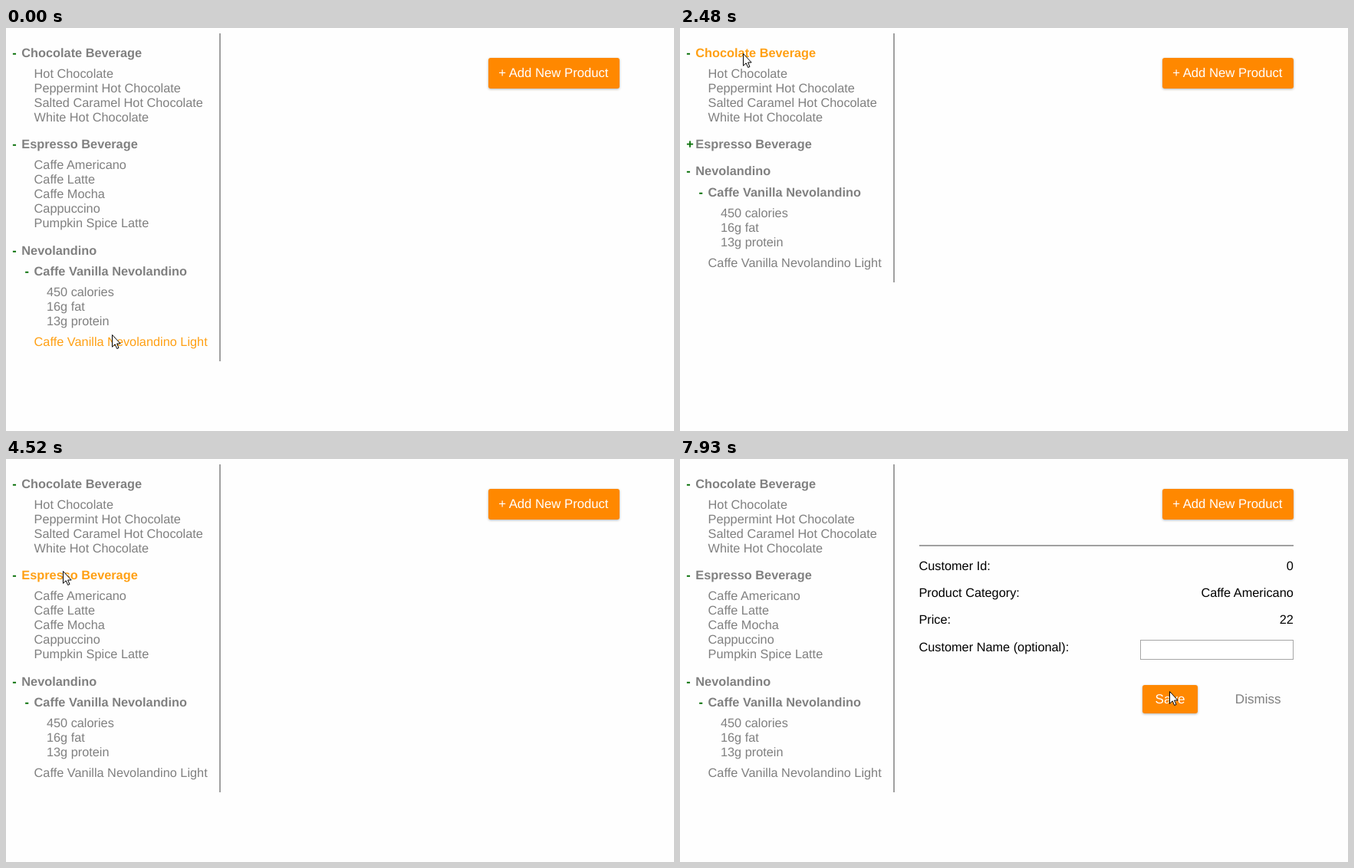
These frames come from a looping animation (871 px wide and 526 px high, 8 s). An HTML page:

```html
<!DOCTYPE html>
<html lang="en">
<head>
<meta charset="utf-8">
<title>Beverage menu</title>
<style>
  html, body { margin: 0; width: 100%; height: 100%; overflow: hidden; background: #fefefe; }
  svg { display: block; width: 871px; height: 526px; }
  text { font: 16.32px "Liberation Sans", Arial, sans-serif; text-rendering: geometricPrecision; white-space: pre; }
  #menu text { fill: #808080; }
  #menu .head { font-weight: bold; }
  #menu .mark { font-weight: bold; fill: #087008; }
  #menu .hover { fill: #ffa014; }
  .button { fill: #ff8800; filter: drop-shadow(0 1px 1.5px rgba(0, 0, 0, .3)); }
  .label { fill: #fff; }
  .small { font-size: 17.1px; }
  .line { fill: #a0a0a0; }
  .end { text-anchor: end; }
</style>
</head>
<body>
<svg viewBox="0 0 871 526">
  <rect id="bar" class="line" x="278" y="7" width="2"/>
  <g id="menu"></g>
  <rect class="button" x="629" y="39" width="171" height="40" rx="3"/>
  <rect id="focus" x="628.75" y="38.75" width="171.5" height="40.5" rx="2" fill="none" stroke="#6a9ee0" stroke-width="1.6"/>
  <text class="label" x="642.2" y="64" style="font-size:16.7px">+ Add New Product</text>
  <g id="form">
    <rect class="line" x="312" y="112" width="488" height="2"/>
    <text x="311.4" y="145">Customer Id:</text>
    <text x="311.4" y="180">Product Category:</text>
    <text x="311.4" y="215">Price:</text>
    <text x="311.4" y="251">Customer Name (optional):</text>
    <text class="end" x="799.8" y="145">0</text>
    <text class="end" id="category" x="799.8" y="180"></text>
    <text class="end" id="price" x="799.8" y="215"></text>
    <rect x="600.5" y="236.5" width="199" height="25" fill="#fff" stroke="#a6a6a6"/>
    <rect class="button" x="603" y="295" width="72" height="37" rx="3"/>
    <text class="label small" x="619.5" y="319">Save</text>
    <text class="small" x="723.8" y="319" fill="#808080">Dismiss</text>
  </g>
  <g id="cursor">
    <circle id="ring" cx="1" cy=".8" r="10" fill="none" stroke="#000" stroke-width="1.1"/>
    <path d="M.5 .5V16.3L4.2 12.8 6.7 18.5 9 17.5 6.6 12H11.2Z" fill="#fff" stroke="#000"/>
  </g>
</svg>
<script>
const LOOP = 8000;
const $ = id => document.getElementById(id);
const show = (el, on) => el.setAttribute('visibility', on ? 'visible' : 'hidden');
const within = (t, spans) => spans.some(([a, b]) => t >= a && t < b);

// Per group: height of its children and when they are folded away
const groups = [
  { height: 84.2, closed: [[2790, 3620]] },
  { height: 103.5, closed: [[1470, 4520]] },
  { height: 0, closed: [] }
];
const clicks = [[1320, 1600], [3470, 3735], [4400, 4520], [5890, 6010], [7400, 7540]];
// Pointer moves: start, last step, number of steps, destination
const start = [138, 400];
const moves = [
  [150, 1070, 8, 85, 155],
  [2030, 2480, 4, 82, 33],
  [3868, 4267, 4, 74, 146],
  [4770, 5310, 5, 722, 66],
  [6600, 7270, 6, 122, 180],
  [7660, 7930, 3, 638, 303]
];

const rows = [];
function addText(cls, x, str) {
  const el = document.createElementNS('http://www.w3.org/2000/svg', 'text');
  el.setAttribute('x', x);
  el.setAttribute('class', cls);
  el.textContent = str;
  $('menu').append(el);
  return el;
}
function addRow(group, level, y, str, head) {
  const x = 20.3 + 16.3 * level;
  rows.push({
    group, level, y,
    label: addText(head ? 'head' : '', x, str),
    mark: head && addText('mark', x - 12, '-')
  });
}
const addItems = (group, level, y, names) =>
  names.forEach((name, i) => addRow(group, level, y + 19 * i, name, false));

addRow(0, 0, 32, 'Chocolate Beverage', true);
addItems(0, 1, 59, ['Hot Chocolate', 'Peppermint Hot Chocolate', 'Salted Caramel Hot Chocolate', 'White Hot Chocolate']);
addRow(1, 0, 151.4, 'Espresso Beverage', true);
addItems(1, 1, 178.4, ['Caffe Americano', 'Caffe Latte', 'Caffe Mocha', 'Cappuccino', 'Pumpkin Spice Latte']);
addRow(2, 0, 290.3, 'Nevolandino', true);
addRow(2, 1, 317.6, 'Caffe Vanilla Nevolandino', true);
addItems(2, 2, 344.9, ['450 calories', '16g fat', '13g protein']);
addItems(2, 1, 409.9, ['Caffe Vanilla Nevolandino Light']);

function pointer(t) {
  let [x, y] = start;
  for (const [t0, t1, n, tx, ty] of moves) {
    if (t < t0) break;
    const step = Math.floor((t - t0) / (t1 - t0) * (n - 1) + 1e-6) + 1;
    const p = Math.min(1, step / n);
    const e = p * p * (3 - 2 * p);
    x += (tx - x) * e;
    y += (ty - y) * e;
  }
  return [Math.round(x), Math.round(y)];
}

function draw(t) {
  const [px, py] = pointer(t);
  const closed = groups.map(g => within(t, g.closed));
  const shift = n => groups.reduce((sum, g, i) => sum + (i < n && closed[i] ? g.height : 0), 0);

  for (const { group, level, y, label, mark } of rows) {
    const mid = Math.floor(y - shift(group));
    const visible = !level || !closed[group];
    label.setAttribute('y', mid + 6);
    label.classList.toggle('hover', px < 278 && py >= mid - 10 && py < mid + 9);
    show(label, visible);
    if (mark) {
      mark.setAttribute('y', mid + 6);
      mark.textContent = closed[group] ? '+' : '-';
    }
  }
  $('bar').setAttribute('height', Math.round(435.4 - shift(3)) - 7);

  const picked = t >= 7400;
  show($('focus'), t >= 5890 && !picked);
  show($('form'), t >= 6010);
  $('category').textContent = picked ? 'Caffe Americano' : 'Hot Chocolate';
  $('price').textContent = picked ? '22' : '10';

  $('cursor').setAttribute('transform', `translate(${px} ${py})`);
  show($('ring'), within(t, clicks));
}

const began = performance.now();
function tick() {
  draw((performance.now() - began) % LOOP);
  requestAnimationFrame(tick);
}
tick();
</script>
</body>
</html>
```
